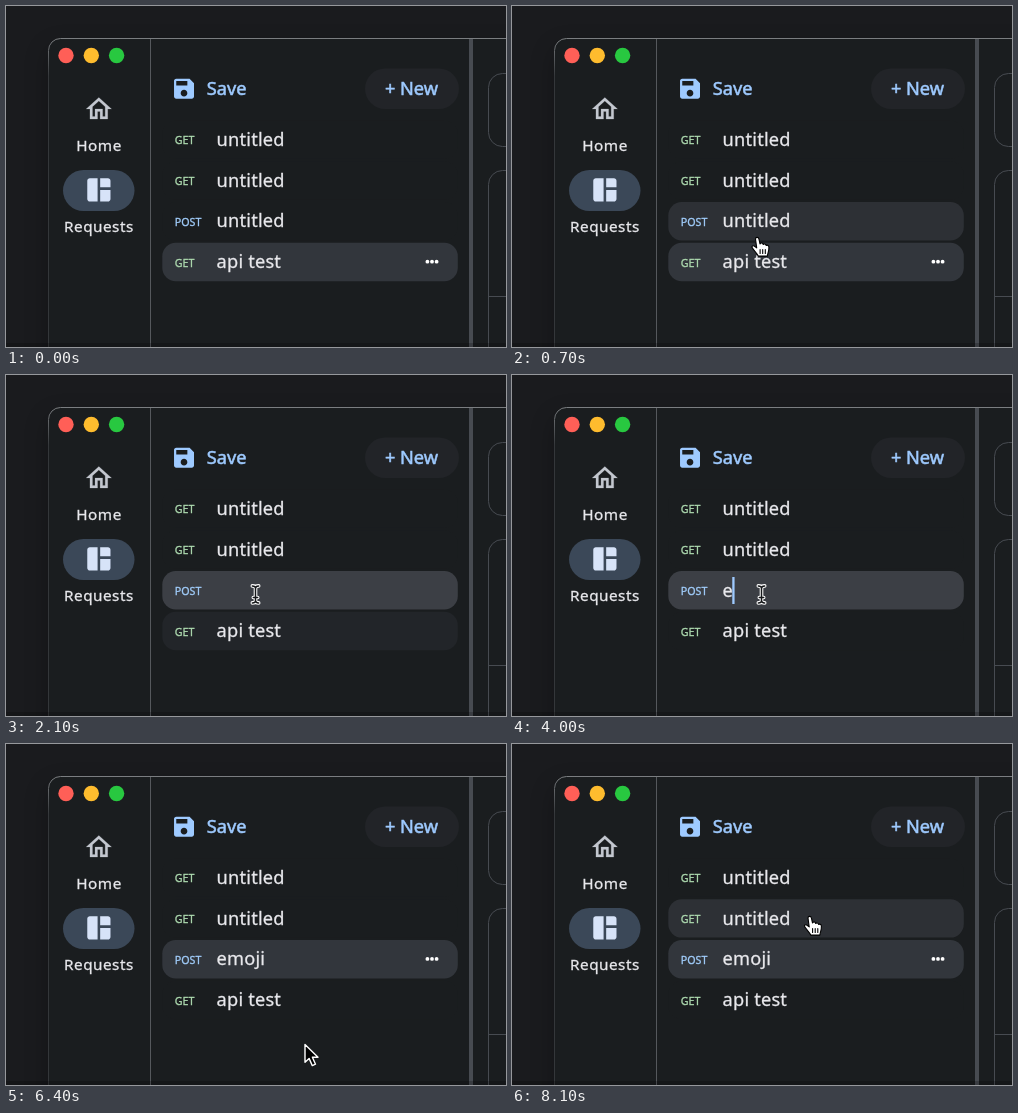
These frames come from a looping animation (500x341 px, 8.51 s). An HTML page:

```html
<!DOCTYPE html>
<html lang="en">
<head>
<meta charset="utf-8">
<title>Rename a request</title>
<style>
  html, body { margin: 0; width: 100%; height: 100%; overflow: hidden; background: #1a1b1e; }
  svg { display: block; width: 500px; height: 341px; }
  text { font-family: "Noto Sans", "Open Sans", sans-serif; white-space: pre; color: #e8e8ec; fill: currentColor; stroke: currentColor; stroke-width: .3px; }
  .name { font-size: 18.2px; letter-spacing: .2px; }
  .method { font-size: 10.7px; }
  .get { color: #aedbb0; }
  .post { color: #a0ccfa; }
  .action { font-size: 18.2px; color: #9ecaff; stroke-width: .55px; }
  .nav { font-size: 15.3px; letter-spacing: .5px; text-anchor: middle; }
  .line { fill: none; stroke: #474b51; }
</style>
</head>
<body>
<svg viewBox="0 0 500 341">
  <defs>
    <linearGradient id="edge" gradientUnits="userSpaceOnUse" x1="0" y1="32" x2="0" y2="70">
      <stop offset="0" stop-color="#7b7e81"/>
      <stop offset="1" stop-color="#34373a"/>
    </linearGradient>
    <filter id="blur" x="-20%" y="-20%" width="140%" height="140%"><feGaussianBlur stdDeviation="12"/></filter>
  </defs>

  <rect width="500" height="341" fill="#1a1b1e"/>
  <rect x="42" y="42" width="520" height="360" rx="12" opacity=".25" filter="url(#blur)"/>
  <path d="M42.5 350V44.5a12 12 0 0 1 12-12H510V350z" fill="#1a1d1f" stroke="url(#edge)"/>
  <circle cx="60" cy="49.5" r="7.7" fill="#ff5f57"/>
  <circle cx="85.3" cy="49.5" r="7.7" fill="#febc2e"/>
  <circle cx="110.6" cy="49.5" r="7.7" fill="#28c840"/>

  <path class="line" d="M144.5 33V341" style="stroke:#55585c"/>
  <path class="line" d="M465 33V341" stroke-width="4"/>
  <rect class="line" x="482.5" y="67.5" width="60" height="73" rx="14"/>
  <rect class="line" x="482.5" y="164.5" width="60" height="200" rx="14"/>
  <path class="line" d="M483 290.5H500"/>

  <path transform="translate(77.6 87.7) scale(1.27)" fill="#c3c7cf" stroke="#c3c7cf" stroke-width=".15" d="M12 5.69l5 4.5V18h-2v-6H9v6H7v-7.81l5-4.5M12 3 2 12h3v8h6v-6h2v6h6v-8h3z"/>
  <text class="nav" x="93" y="145">Home</text>
  <rect x="57" y="164" width="71.5" height="41" rx="20.5" fill="#3b4858"/>
  <path transform="translate(77.4 168.4) scale(1.29)" fill="#d7e3f8" d="M11 21H5c-1.1 0-2-.9-2-2V5c0-1.1.9-2 2-2h6v18zm2 0h6c1.1 0 2-.9 2-2v-7h-8v9zm8-11V5c0-1.1-.9-2-2-2h-6v7h8z"/>
  <text class="nav" x="92.9" y="226.3">Requests</text>

  <path transform="translate(164.7 69.4) scale(1.11)" fill="#9ecaff" d="M17 3H5c-1.11 0-2 .9-2 2v14c0 1.1.89 2 2 2h14c1.1 0 2-.9 2-2V7l-4-4zm-5 16c-1.66 0-3-1.34-3-3s1.34-3 3-3 3 1.34 3 3-1.34 3-3 3zm3-10H5V5h10v4z"/>
  <text class="action" x="200.8" y="89.3">Save</text>
  <rect x="359" y="62.5" width="94" height="40.5" rx="20.2" fill="#222428"/>
  <text class="action" x="378.9" y="89.3">+ New</text>

  <g id="rows"></g>
  <rect id="caret" y="202" width="2.3" height="27" fill="#9ecaff"/>
  <rect y="337" width="500" height="4" opacity=".2"/>

  <g id="cursor" stroke-linejoin="round" stroke-linecap="round">
    <path id="arrow" fill="#000" stroke="#fff" stroke-width="1.4" d="M.5.5V18.3l4.1-3.9 3.2 7.2 3.2-1.4-3.1-7h5.6z"/>
    <path id="hand" fill="#fff" stroke="#000" stroke-width="1.1" d="M-2 1.6C-2-.6 1-.7 1.4 1.4L2.5 6.4C3.4 5 5.4 5.4 5.6 7 6.8 5.8 8.4 6.4 8.6 8 10 7.2 11.4 8 11.4 9.6 11.6 13 10.6 14.6 9.8 18.6H.8C-.6 15.6-3 13.6-5.2 10.4-6.4 8.6-4.2 7.4-2.6 9L-.8 10.4zM2.6 12v4M5.2 12v4M7.8 12v4"/>
    <g id="beam" fill="none">
      <path stroke="#fff" stroke-width="3.6" d="M-3.2-7.6Q0-7.6 0-5Q0-7.6 3.2-7.6M0-5V7M-3.2 9.4Q0 9.4 0 7Q0 9.4 3.2 9.4M-2.2 4H2.2"/>
      <path stroke="#16181a" stroke-width="1.5" d="M-3.2-7.6Q0-7.6 0-5Q0-7.6 3.2-7.6M0-5V7M-3.2 9.4Q0 9.4 0 7Q0 9.4 3.2 9.4M-2.2 4H2.2"/>
    </g>
  </g>
</svg>
<script>
const LOOP = 8510, STEP = 100;
const EDIT_START = 2100, EDIT_END = 6400, CARET_START = 2200;
const EDITED = 2, FIRST_SELECTED = 3, NAME_X = 210.6;
const BASE = [26, 29, 31], HOVER = [45, 48, 53], SELECTED = [50, 54, 60], ACTIVE = [60, 63, 69];
const KEYS = [[4000, "e"], [4100, "em"], [4300, "emo"], [4700, "emoj"], [4900, "emoji"]];
// time, x, y of the pointer's hot spot
const PATH = [
  [100, 195, 300], [300, 212, 274], [500, 235, 244], [700, 245.5, 231.5], [900, 250, 225],
  [1300, 250, 225], [1500, 249.5, 218.5], [5700, 249.5, 218.5], [5800, 258, 232],
  [5900, 286, 279], [6100, 298.5, 300], [7200, 298.5, 300], [7300, 299, 302],
  [7400, 300, 270], [7500, 299, 225], [7600, 298, 187], [7700, 298, 172.5]
];

const $ = id => document.getElementById(id);
const clamp = v => Math.max(0, Math.min(1, v));
const mix = (a, b, k) => a.map((v, i) => v + (b[i] - v) * k);
const show = (el, on) => el.style.display = on ? "" : "none";

function add(parent, tag, attrs, text = "") {
  const el = document.createElementNS("http://www.w3.org/2000/svg", tag);
  for (const key in attrs) el.setAttribute(key, attrs[key]);
  el.textContent = text;
  return parent.appendChild(el);
}

const rows = ["GET", "GET", "POST", "GET"].map((method, i) => {
  const y = 133.5 + 40.8 * i;
  const box = add($("rows"), "rect", { x: 156.3, y: y - 19.1, width: 295.5, height: 38.4, rx: 13.5 });
  add($("rows"), "text", { class: `method ${method.toLowerCase()}`, x: 168.8, y: y + 4.6 }, method);
  const name = add($("rows"), "text", { class: "name", x: NAME_X, y: y + 6.2 }, i === 3 ? "api test" : "untitled");
  const dots = add($("rows"), "g", { fill: "#fff" });
  for (const dx of [-4.6, 0, 4.6]) add(dots, "circle", { cx: 426 + dx, cy: y - .2, r: 1.9 });
  return { y, box, name, dots };
});

function pointerAt(t) {
  const next = PATH.findIndex(p => p[0] > t);
  if (next < 0) return PATH[PATH.length - 1].slice(1);
  const a = PATH[next - 1], b = PATH[next], k = (t - a[0]) / (b[0] - a[0]);
  return mix(a, b, k).slice(1);
}

function draw(t) {
  const visible = t >= PATH[0][0];
  const [x, y] = visible ? pointerAt(t) : [-99, -99];
  const hovered = rows.findIndex(r => x > 156 && x < 452 && Math.abs(y - r.y) <= 19.5);
  const editing = t >= EDIT_START && t < EDIT_END;
  const typed = KEYS.filter(k => k[0] <= t).pop() || [CARET_START, ""];

  rows.forEach((row, i) => {
    const selected = i === EDITED ? clamp((t - 1900) / 200)
      : i === FIRST_SELECTED ? clamp(1 - (t - 1900) / 300) : 0;
    const over = i === hovered;
    const fill = mix(over ? HOVER : BASE, over ? ACTIVE : SELECTED, selected);
    row.box.setAttribute("fill", `rgb(${fill.map(Math.round)})`);
    show(row.dots, i === EDITED ? t >= EDIT_END : i === FIRST_SELECTED && t < 2000);
  });

  const name = rows[EDITED].name;
  name.textContent = t < EDIT_START ? "untitled" : typed[1];
  name.setAttribute("y", rows[EDITED].y + (editing ? 7.2 : 6.2));
  $("caret").setAttribute("x", NAME_X - .8 + (typed[1] ? name.getComputedTextLength() : 0));
  show($("caret"), editing && t >= CARET_START && Math.floor((t - typed[0]) / 500) % 2 === 0);

  const kind = hovered < 0 ? "arrow" : editing && hovered === EDITED ? "beam" : "hand";
  for (const id of ["arrow", "hand", "beam"]) show($(id), id === kind);
  show($("cursor"), visible);
  $("cursor").setAttribute("transform", `translate(${x} ${y})`);
}

function frame() {
  const t = performance.now() % LOOP;
  draw(Math.floor(t / STEP) * STEP);
  requestAnimationFrame(frame);
}
frame();
</script>
</body>
</html>
```
